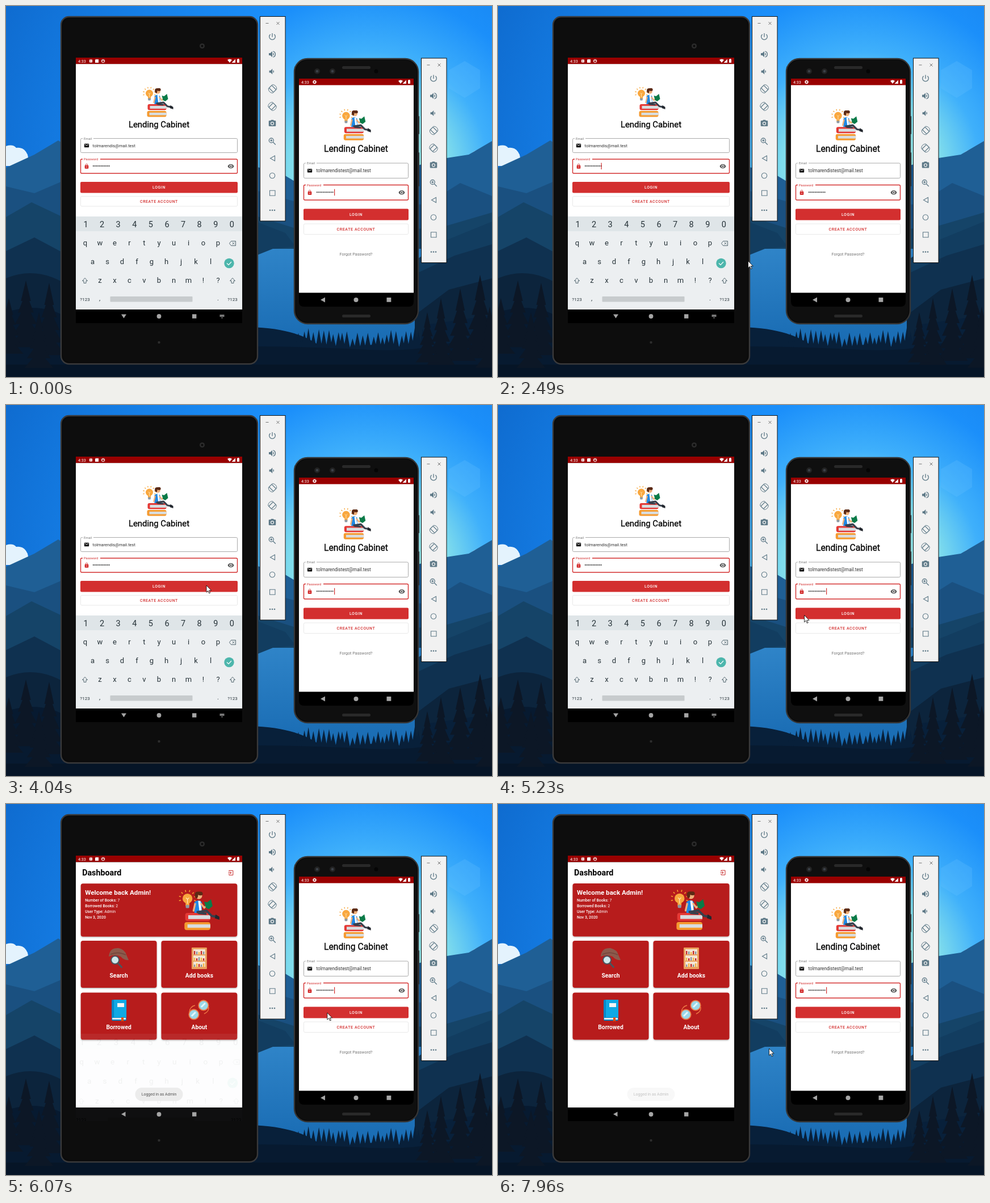
Animation of 856 by 654 pixels, one loop 8000 ms. Source, as an HTML page:

```html
<!DOCTYPE html>
<html lang="en">
<head>
<meta charset="utf-8">
<title>Login demo</title>
<style>
html, body { margin: 0; width: 100%; height: 100%; overflow: hidden; background: #081a30; }
svg { display: block; width: 856px; height: 654px; }
text { font-family: Roboto, Arial, sans-serif; white-space: pre; }
</style>
</head>
<body>
<svg id="stage" viewBox="0 0 856 654"></svg>
<script>
const RED = '#d32f2f', CARD = '#b71c1c', STEEL = '#5f7a88';
const APP = 'Lending Cabinet', USER = 'tolmarendis', HOST = '@mail.test';

// Drawing helpers
const rect = (x, y, w, h, fill, more = '') => `<rect x="${x}" y="${y}" width="${w}" height="${h}" fill="${fill}" ${more}/>`;
const circle = (x, y, r, fill, more = '') => `<circle cx="${x}" cy="${y}" r="${r}" fill="${fill}" ${more}/>`;
const path = (d, fill, more = '') => `<path d="${d}" fill="${fill}" ${more}/>`;
const line = (d, color, w, more = '') => path(d, 'none', `stroke="${color}" stroke-width="${w}" ${more}`);
const text = (x, y, size, str, fill = '#000', more = '') => `<text x="${x}" y="${y}" font-size="${size}" fill="${fill}" ${more}>${str}</text>`;
const mid = (x, y, size, str, fill, more = '') => text(x, y, size, str, fill, `text-anchor="middle" ${more}`);
const group = (id, body, more = '') => `<g id="${id}" ${more}>${body}</g>`;
const at = (x, y, s, body) => `<g transform="translate(${x} ${y}) scale(${s})">${body}</g>`;

const GLYPH = {
  power: 'M13 3h-2v10h2zm4.8 2.2-1.4 1.4A7 7 0 0 1 19 12a7 7 0 1 1-14 0 7 7 0 0 1 2.6-5.4L6.2 5.2A9 9 0 0 0 3 12a9 9 0 1 0 18 0c0-2.7-1.2-5.2-3.2-6.8z',
  loud: 'M3 9v6h4l5 5V4L7 9zm13.5 3A4.5 4.5 0 0 0 14 8v8a4.5 4.5 0 0 0 2.5-4zM14 3.2v2.1a7 7 0 0 1 0 13.4v2.1a9 9 0 0 0 0-17.6z',
  quiet: 'M5 9v6h4l5 5V4L9 9zm13.5 3A4.5 4.5 0 0 0 16 8v8a4.5 4.5 0 0 0 2.5-4z',
  camera: 'M9 2 7.2 4H4a2 2 0 0 0-2 2v12a2 2 0 0 0 2 2h16a2 2 0 0 0 2-2V6a2 2 0 0 0-2-2h-3.2L15 2zm3 15a5 5 0 1 1 0-10 5 5 0 0 1 0 10zm0-8a3 3 0 1 0 0 6 3 3 0 0 0 0-6z',
  mail: 'M20 4H4a2 2 0 0 0-2 2v12a2 2 0 0 0 2 2h16a2 2 0 0 0 2-2V6a2 2 0 0 0-2-2zm0 4-8 5-8-5V6l8 5 8-5z',
  lock: 'M18 8h-1V6A5 5 0 0 0 7 6v2H6a2 2 0 0 0-2 2v10a2 2 0 0 0 2 2h12a2 2 0 0 0 2-2V10a2 2 0 0 0-2-2zm-6 9a2 2 0 1 1 0-4 2 2 0 0 1 0 4zm3-9H9V6a3 3 0 0 1 6 0z',
  eye: 'M12 4.5C7 4.5 2.7 7.6 1 12a11.8 11.8 0 0 0 22 0C21.3 7.6 17 4.5 12 4.5zM12 17a5 5 0 1 1 0-10 5 5 0 0 1 0 10zm0-8a3 3 0 1 0 0 6 3 3 0 0 0 0-6z'
};
const glyph = (name, x, y, size, fill) =>
  at(x - size / 2, y - size / 2, size / 24, path(GLYPH[name], fill, 'fill-rule="evenodd"'));

// Landscape
let seed = 7;
const rnd = () => (seed = seed * 16807 % 2147483647) / 2147483647;

function fir(x, top, h, w, fill) {
  let d = '';
  for (let i = 0; i < 5; i++) {
    const y = top + h * i * .17, r = w * (.3 + i * .18) / 2;
    d += `M${x} ${y}l${r} ${h * .3}h${-2 * r}z`;
  }
  return path(d, fill);
}

function landscape() {
  let s = rect(0, 0, 856, 654, 'url(#sky)');
  s += path('M808 97l27 16v32l-27 17-28-17v-32z', '#6cc4ff', 'opacity=".22"');
  s += path('M0 247q12-4 18 3 14-2 20 12l4 20H0zM856 245q-14-2-18 8-18 0-24 16l42 12z', '#e4f3fd');
  s += path('M0 285 50 262 92 237 190 300 330 260 447 285 480 292 510 310 690 290 776 268 815 262 856 238V654H0z', '#1f5f95');
  s += path('M0 318 50 330 120 300 440 325 510 345 740 350 800 312 856 335V654H0z', '#1a5080');
  s += path('M0 372 45 346 100 372 440 370 520 395 760 392 856 364V654H0z', '#154468');
  s += rect(430, 428, 350, 190, 'url(#lake)');
  s += path('M440 380 492 400 510 424 470 428 440 440zM726 445 770 415 856 380V500H726z', '#123d60');
  s += path('M0 432 50 408 110 440V654H0zM726 470 790 440 856 420V600H726z', '#0f3150');
  s += path('M0 480Q60 455 120 500V654H0zM720 545 780 500 856 480V654H720z', '#0c243c');
  s += path('M430 566Q505 568 545 594T610 606 690 600 740 562L856 545V654H430z', '#08203a');
  let spikes = '';
  for (let x = 515; x < 735; x += 6 + rnd() * 5) {
    const tip = 590 - Math.abs(x - 630) * .12 - rnd() * 14;
    spikes += `M${x - 7} 610L${x} ${tip} ${x + 7} 610z`;
  }
  s += path(spikes, '#08203a');
  s += path('M0 540Q60 520 110 550V654H0zM430 600Q520 600 640 606T856 570V654H430z', '#071a30');
  s += path('M0 632H856V654H0z', '#061527');
  for (const [x, y, h, w] of [[35, 484, 120, 58], [76, 488, 130, 56], [5, 515, 100, 50], [58, 540, 100, 50], [835, 474, 150, 62], [800, 498, 130, 54], [766, 515, 120, 48], [742, 540, 90, 40], [852, 530, 110, 50]])
    s += fir(x, y, h, w, '#0c1726');
  return s;
}

// Emulator side bar
function toolbar() {
  const rotate = dir => `<g transform="scale(${dir} 1)">` +
    rect(-3.3, -5.4, 6.6, 10.8, 'none', `stroke="${STEEL}" stroke-width="1.3" transform="rotate(-45)"`) +
    line('M-1 -7.3A7.3 7.3 0 0 1 7.2 1M1 7.3A7.3 7.3 0 0 1-7.2-1', STEEL, 1) + '</g>';
  return rect(447.5, 18.5, 44.5, 360.5, '#f1f1f1', 'stroke="#111"') +
    line('M457.5 30.5h5M476.5 28l5 5m0-5-5 5', '#666', .9) +
    glyph('power', 469, 54, 16, STEEL) + glyph('loud', 469, 85, 16, STEEL) + glyph('quiet', 468, 115.5, 15, STEEL) +
    at(469.5, 146, 1, rotate(1)) + at(469, 177, 1, rotate(-1)) + glyph('camera', 469, 207, 15, STEEL) +
    line('M471.3 237a4 4 0 1 1-8 0a4 4 0 0 1 8 0M470.3 240l4.5 4.5M465.3 237h4m-2-2v4', STEEL, 1.3) +
    line('M473.5 264v9l-8-4.5zM464.5 325.3h9.5v9h-9.5z', STEEL, 1.1) +
    circle(469, 299, 4.7, 'none', `stroke="${STEEL}" stroke-width="1.1"`) +
    [465, 469, 473].map(x => circle(x, 360, 1.3, STEEL)).join('');
}

// Reader on a pile of books, in a 55 x 55 box
const reader = (() => {
  let rays = '';
  for (let i = 0; i < 8; i++) {
    const a = Math.PI * (i / 6 - 1.08), c = Math.cos(a), s = Math.sin(a);
    rays += `M${11 + 9 * c} ${13 + 9 * s}l${2.5 * c} ${2.5 * s}`;
  }
  return line(rays, '#f6a02d', 1.2) + circle(11, 13, 6.5, '#f9a73e') + rect(8.5, 18, 5, 5, '#f9a73e') +
    line('M9 12l2 2 2-2M11 14v6', '#fff0c8', .8) + rect(8.7, 21.5, 4.6, 4, '#8d99a3', 'rx="1"') +
    rect(8, 32, 33, 10.5, '#e53935', 'rx="3"') + rect(12, 35, 29, 5, '#d8dde0') +
    rect(7, 44, 34, 10.5, '#f59a2f', 'rx="3"') + rect(11, 47, 30, 4.5, '#d8dde0') +
    path('M20 18Q25 13 30 18L30 32H20z', '#1e88e5') + path('M25 16h3l2 16h-3z', '#fff') +
    line('M21 20l-2 9M29 20l4 5 4-3', '#eeb07c', 2.4, 'stroke-linecap="round"') +
    line('M23 31l13-2 7 7 7 1M25 32l11 1', '#37404d', 3, 'stroke-linejoin="round"') +
    path('M48 34l5 3v4l-6-2z', '#23272e') +
    circle(26, 9.5, 4.3, '#eeb07c') + path('M21 11Q19 3 26 4q6-1 5 4-3 2-6 0 0 4-2 5z', '#5b2914') +
    path('M33 17l4 1 5-4 2 9-5 4-4-2z', '#0a7b48');
})();

// Login form shared by both devices
function form(d, id) {
  const { x, w, cx, ys, hs, fs, ls, mail } = d, r = x + w;
  const my = ys[0] + hs[0] / 2, py = ys[1] + hs[1] / 2, tx = x + d.inset;
  const box = (i, color, sw) => rect(x + .5, ys[i] + .5, w - 1, hs[i] - 1, 'none', `rx="2" stroke="${color}" stroke-width="${sw}"`);
  const label = (y, str, gap, color) => rect(x + 4, y - 2, gap, 4, '#fff') + text(x + 6, y + 2, ls, str, color);
  let dots = '';
  for (let i = 0; i < 11; i++) dots += circle(tx + 1.3 + i * 2.78, py - .5, .95, '#222');
  const btn = `x="${x}" y="${ys[2]}" width="${w}" height="${hs[2]}" rx="2"`;
  return box(0, '#aaa', 1) + glyph('mail', x + 11, my, 10, '#111') +
    group(id + 'Filled', label(ys[0] + .5, 'Email', 19, '#777') + text(tx, my + 2.7, fs, mail, '#333') + dots) +
    group(id + 'Empty', text(x + 20, my + 2.7, fs, 'Email', '#777'), 'display="none"') +
    box(1, RED, 1.4) + label(ys[1] + .5, 'Password', 31, RED) +
    glyph('lock', x + 11, py, 10, RED) + glyph('eye', r - 12, py, 12, '#555') +
    rect(tx + d.caret, py - 6, 1.2, 11.5, RED, `id="${id}Caret"`) +
    `<clipPath id="${id}Clip"><rect ${btn}/></clipPath><rect ${btn} fill="${RED}"/>` +
    `<g clip-path="url(#${id}Clip)">${circle(d.tap[0], d.tap[1], 0, '#fff', `id="${id}Ripple" opacity="0"`)}</g>` +
    mid(cx, ys[2] + hs[2] / 2 + 2.5, d.bs, 'LOGIN', '#fff', 'font-weight="500" letter-spacing=".6"') +
    box(3, '#e8e8e8', 1) + mid(cx, ys[3] + hs[3] / 2 + 2.5, d.bs, 'CREATE ACCOUNT', RED, 'font-weight="500" letter-spacing=".6"');
}

const appTitle = (x, y, size) => mid(x, y, size, APP, '#000', 'stroke="#000" stroke-width=".3"');
const signal = (x, y) => path(`M${x} ${y - 2}q4-3 8 0l-4 5zM${x + 14} ${y - 3.5}v6.5h-6.5zM${x + 17} ${y - 3}h1v-1h2v1h1v6h-4z`, '#fff');

function keyboard() {
  const ink = '#263238';
  let s = rect(123, 371, 293, 164, '#eceff1') + rect(123, 371, 293, 26, '#dfe5e8');
  const row = (keys, x, step, y, size) => [...keys].forEach((k, i) => s += mid(x + i * step, y, size, k, ink));
  row('1234567890', 140.5, 28.6, 390, 14.5);
  row('qwertyuiop', 139.5, 26, 422, 13);
  row('asdfghjkl', 152.5, 26, 454.5, 13);
  row('zxcvbnm!?', 165.5, 26, 488, 13);
  for (const x of [139, 399]) {
    s += line(`M${x} 479.5l4.5 5h-2.5v4h-4v-4h-2.5z`, '#455a64', .9);
    s += mid(x, 519.5, 8, '?123', ink);
  }
  return s + line('M396.5 414.5h8v8h-8l-3-4zM398.5 416.5l4 4m0-4-4 4', '#455a64', .9) +
    circle(393, 453.5, 8.7, '#4db6ac') + line('M389 453.5l3 3 5-5.5', '#fff', 1.2) +
    mid(165, 519, 11, ',', ink) + mid(373.5, 519, 11, '.', ink) + rect(183.5, 512, 145, 9.5, '#c7cbcd', 'rx="1"');
}

function dashboard() {
  const bold = 'font-weight="700"';
  const card = (x, y, w, h) => rect(x, y, w, h, CARD, 'rx="4" filter="url(#soft)"');
  const info = (y, label, val, id) => text(139, y, 6.9, `<tspan font-weight="500">${label}</tspan><tspan id="${id}">${val}</tspan>`, '#fff');
  let s = rect(123, 91, 293, 11, '#990000', 'id="bar"') + text(134, 126, 14.3, 'Dashboard', '#000', bold) +
    line('M393 119v-2h7v8h-7v-2M391.5 121h5.5m-2-2 2 2-2 2', '#c62828', 1) + card(131.5, 140, 276, 93.5) +
    text(139, 160, 11.6, 'Welcome back Admin!', '#fff', bold) +
    info(172, 'Number of Books:', ' 7', 'books') + info(182, 'Borrowed Books:', ' 2', 'loans') +
    info(192, 'User Type:', ' Admin', 'type') + info(202, 'Nov 3, 2020', '', 'date') + at(305, 149, 1.34, reader);
  ['Search', 'Add books', 'Borrowed', 'About'].forEach((name, i) => {
    const x = 131.5 + i % 2 * 142, y = 241 + (i >> 1) * 91.6;
    s += card(x, y, 134, 83) + mid(x + 67, y + 64.5, 10.3, name, '#fff', bold);
  });
  s += path('M181 269Q182 253 198 254q12 3 14 12l4 9q-8 1-14-6-10-5-21 0z', '#8d5a4c') +
    line('M184 265q13-6 27 1', '#74453b', 1.6) + circle(192, 275, 7, '#cfe8ec', 'stroke="#4b555e" stroke-width="2"') +
    line('M197.5 281l6 6.5', '#4b555e', 3, 'stroke-linecap="round"');
  s += rect(327, 253, 27, 38, '#eba15e', 'rx="1"');
  for (let i = 0; i < 3; i++) {
    const y = 256 + i * 11;
    s += rect(330, y, 21, 9, '#f5e6d5');
    for (let j = 0; j < 5; j++) s += rect(331 + j * 4, y + 3 + (i + j) % 3, 2.4, 6 - (i + j) % 3, ['#c62828', '#8b979e', '#f2b544'][(i * 2 + j) % 3]);
  }
  s += rect(186, 345, 26, 37, '#0288c9', 'rx="2"') + rect(190, 345, 22, 31, '#10a9e4') + rect(187, 377, 24, 3, '#e6edf0') +
    rect(196, 351, 12, 7, '#f4f4f4') + path('M203 376h4v8l-2-2-2 2z', '#e65100');
  s += line('M323 367q1-10 10-12M357 358q1 8-8 12', '#ef7b45', 1.4);
  for (const [x, y] of [[331, 371], [348, 355]])
    s += circle(x, y, 8.7, '#9bd8e8', 'stroke="#ef7b45" stroke-width="1.8"') + line(`M${x - 4} ${y + 3}l7-7`, '#e4f7fb', 3);
  return s;
}

const tabletForm = { x: 131, w: 277, cx: 269.5, ys: [233, 269.5, 310, 335], hs: [26, 26, 19.5, 18.5], fs: 7.5, ls: 5.7, bs: 6.9, inset: 21.5, caret: 29, tap: [353, 319], mail: USER + HOST };
const phoneForm = { x: 524, w: 185, cx: 616.5, ys: [276.5, 315, 357.5, 383.5], hs: [27.5, 27.5, 20, 19.5], fs: 8.2, ls: 5.7, bs: 7, inset: 22.5, caret: 31.5, tap: [566, 368], mail: USER + 'test' + HOST };

function tablet() {
  return rect(97, 19, 346, 612, '#0b0b0b', 'rx="14" stroke="#3a3a3b" stroke-width="2.4"') +
    rect(101, 23, 338, 604, '#0d0d0d', 'rx="11"') + circle(345.5, 70.5, 4.5, '#2b2b2b') + circle(345.5, 70.5, 2, '#0b0b0b') +
    circle(269.5, 593, 2.2, '#2d2d2d') +
    '<g clip-path="url(#tabletScreen)">' + rect(123, 91, 293, 468, '#000') + rect(123, 91, 293, 11.5, '#990000') +
    text(127, 99.5, 7.2, '4:33', '#fff') + rect(147, 94.5, 5, 5, '#fff') + rect(149, 96, 1, 2, '#900') +
    path('M158 94h5v6h-6v-5z', '#fff') + circle(171, 97, 2.8, 'none', 'stroke="#fff"') + line('M169 97q2-2 4 0', '#fff', 1) +
    signal(390, 97) + rect(123, 102.5, 293, 432.5, '#fff') +
    group('login', rect(123, 102.5, 293, 432.5, '#fff') + at(241.5, 141, 1, reader) + appTitle(269.5, 213.5, 14.9) + form(tabletForm, 't')) +
    group('dash', dashboard(), 'display="none"') + group('keys', keyboard()) +
    group('toast', rect(227.5, 500, 84, 23.5, '#ececec', 'rx="11.7"') + mid(269.5, 514, 7, 'Logged in as Admin', '#555')) +
    path('M203 543.5h9l-4.5 7z', '#a5a5a5', 'id="down"') + path('M210.5 542.5v8.5l-7.5-4.2z', '#a5a5a5', 'id="back"') +
    circle(269.5, 547, 3.9, '#a5a5a5') + rect(328, 543.3, 7.4, 7.4, '#a5a5a5') +
    group('hide', rect(376.5, 544, 8, 4, '#777') + path('M378.5 549h4l-2 2z', '#777')) + '</g>';
}

function phone() {
  return rect(724, 194, 4, 32, '#151515', 'rx="1"') + rect(724, 258, 4, 60, '#151515', 'rx="1"') +
    rect(508, 93, 218, 467, '#0b0b0b', 'rx="23" stroke="#353536" stroke-width="2.4"') + rect(511, 96, 212, 461, '#0f0f0f', 'rx="20"') +
    rect(592, 106, 50, 5, '#292929', 'rx="2.5"') + rect(592, 544, 50, 5, '#292929', 'rx="2.5"') +
    [548, 575].map(x => circle(x, 115, 5, '#222') + circle(x, 115, 2.3, '#3b4048')).join('') + circle(652, 115, 3.5, '#050505') +
    path('M516 128h202v393q0 9-9 9H525q-9 0-9-9z', '#000') + rect(516, 128, 202, 12, '#990000') +
    text(520, 136.7, 7.2, '4:33', '#fff') + circle(543.5, 134, 2.1, 'none', 'stroke="#fff" stroke-width="1.5"') +
    circle(543.5, 134, 3, 'none', 'stroke="#fff" stroke-dasharray="1.2 1.15"') + signal(691, 134) +
    rect(516, 139.5, 202, 366, '#fff') + at(587.5, 180, 1.04, reader) + appTitle(616.5, 257, 15.7) +
    form(phoneForm, 'p') + mid(616.5, 439.7, 7.2, 'Forgot Password?', '#757575') +
    path('M562 513.5v9l-8-4.5z', '#a5a5a5') + circle(616.5, 518, 4, '#a5a5a5') + rect(670.5, 514, 7.8, 7.8, '#a5a5a5');
}

document.getElementById('stage').innerHTML = `<defs>
  <radialGradient id="sky" cx="640" cy="290" r="700" gradientUnits="userSpaceOnUse"><stop stop-color="#b4f0d8"/><stop offset=".2" stop-color="#7fdcec"/><stop offset=".3" stop-color="#3fb0fb"/><stop offset=".45" stop-color="#1b8ffa"/><stop offset="1" stop-color="#0f6cd0"/></radialGradient>
  <linearGradient id="lake" x2="0" y2="1"><stop stop-color="#2f84c8"/><stop offset="1" stop-color="#1668b0"/></linearGradient>
  <filter id="soft" x="-10%" y="-20%" width="120%" height="150%"><feDropShadow dx="0" dy="1.2" stdDeviation="1" flood-opacity=".3"/></filter>
  <clipPath id="tabletScreen"><rect x="123" y="91" width="293" height="468"/></clipPath></defs>` +
  landscape() + tablet() + phone() + toolbar() + `<g transform="translate(284 73.5)">${toolbar()}</g>` +
  group('mouse', path('M0 0v12.2l2.8-2.6 2 4.4 1.9-.8-2-4.3h3.9z', '#fff', 'stroke="#000" stroke-width=".8"'));

// Animation
const $ = id => document.getElementById(id);
const set = (id, name, v) => $(id).setAttribute(name, v);
const show = (id, on) => set(id, 'display', on ? 'inline' : 'none');
const clamp = v => Math.max(0, Math.min(1, v));
const ramp = (t, a, b) => clamp((t - a) / (b - a));
const smooth = p => p * p * (3 - 2 * p);
const wrap = (t, n) => (t % n + n) % n;

// Pointer stops: time, x, y
const stops = [[740, 815, 656], [1490, 534, 590], [1740, 534, 590], [3210, 353, 318], [4590, 353, 318],
  [5230, 539.5, 370.5], [5430, 565.5, 368], [7150, 566.5, 368], [7570, 505, 388], [7960, 477.5, 431]];

function pointer(t) {
  let [, x, y] = stops[0];
  for (let i = 1; i < stops.length; i++) {
    const [a, x0, y0] = stops[i - 1], [b, x1, y1] = stops[i];
    if (t < a) break;
    const p = smooth(ramp(t, a, b));
    x = x0 + (x1 - x0) * p;
    y = y0 + (y1 - y0) * p;
  }
  return `translate(${x} ${y})`;
}

const zoom = (s, dy = 0) => `translate(269.5 ${325 + dy}) scale(${s}) translate(-269.5 -325)`;

function ripple(id, t, start, reach) {
  const p = ramp(t, start, start + 450);
  set(id, 'r', reach * Math.sqrt(p));
  set(id, 'opacity', .28 * (p > 0) * (1 - smooth(ramp(p, .4, 1))));
}

function draw(now) {
  const t = now % 8000;
  const left = (1 - ramp(t, 5835, 6135)) ** 3, fade = ramp(t, 5835, 5955), grow = 1 + .05 * (1 - left);
  const cleared = t > 5790;

  set('mouse', 'transform', pointer(t));
  show('tCaret', wrap(t - 380, 1005) < 503);
  set('tCaret', 'x', cleared ? 152.4 : 181.5);
  show('pCaret', wrap(t - 214, 1005) >= 503);
  ripple('tRipple', t, 3590, 235);
  ripple('pRipple', t, 6800, 155);

  show('tFilled', !cleared);
  show('tEmpty', cleared);
  show('login', fade < 1);
  set('login', 'transform', zoom(grow));
  show('dash', fade > 0);
  set('dash', 'opacity', fade);
  set('dash', 'transform', zoom(1 - .15 * left));
  show('bar', fade < 1);
  for (const id of ['books', 'loans']) show(id, t > 5950);

  const drop = (t - 5940) / 140;
  show('keys', drop < 1);
  set('keys', 'opacity', 1 - clamp(drop));
  set('keys', 'transform', zoom(grow, 34 * clamp(drop)));
  show('down', t < 5950);
  show('hide', t < 5950);
  show('back', t >= 5950);
  set('toast', 'opacity', ramp(t, 5960, 6060) * (1 - ramp(t, 7880, 8005)));
  requestAnimationFrame(draw);
}
draw(0);
</script>
</body>
</html>
```
